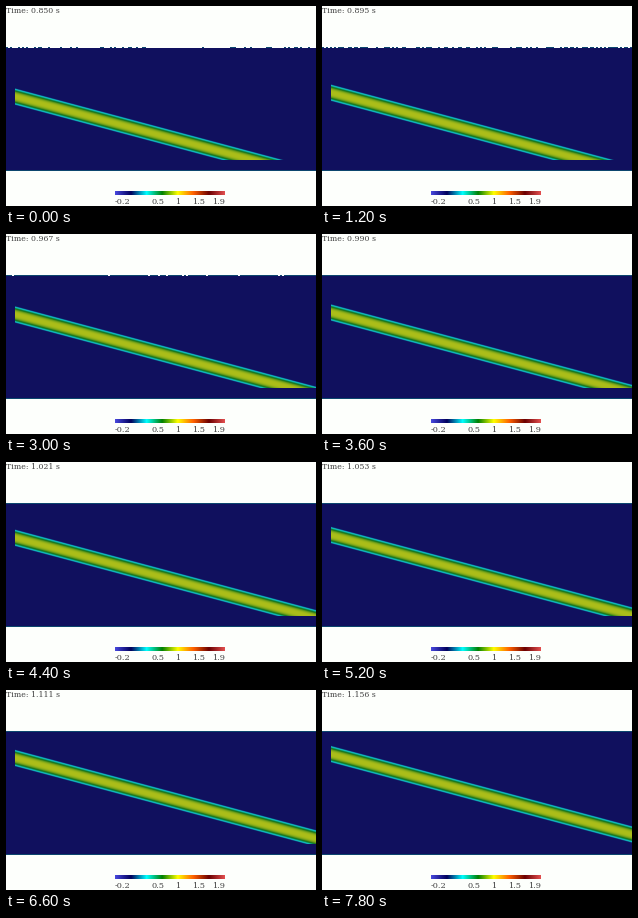
A matplotlib script that plays this animation: 310 by 200 pixels, repeating every 8 s.

```python
import numpy as np
import matplotlib.pyplot as plt
from matplotlib.animation import FuncAnimation

W, H, DPI = 310, 200, 100
FRAMES, INTERVAL = 40, 200
T0, DT, STEPS = 0.85, 0.0045, 68      # the clock advances in whole solver steps

PAPER = (253, 255, 252)
EDGE = (12, 70, 110)
TOP, BOTTOM = 41, 165                 # domain rows
LEFT, FLOOR = 9, 154                  # limits of the wave band
SLOPE, SPEED, START = 0.267, 86.7, 90.6
HALF = 8.5                            # half height of the band
REST, PEAK = 1 / 7, 0.545             # scale positions of still water and crest
SUB = 4                               # samples per pixel row

# evenly spaced keys of the colour scale
SCALE = ["#4747db", "#00005c", "#00ffff", "#008000",
         "#ffff00", "#ff6100", "#6b0000", "#e04d4d"]
KEYS = np.array([[int(c[k:k + 2], 16) for k in (1, 3, 5)] for c in SCALE])


def scale_colour(pos):
    knots = np.linspace(0, 1, len(KEYS))
    return np.stack([np.interp(pos, knots, ch) for ch in KEYS.T], axis=-1)


def lit(pos):
    """Scale colour as it looks under the scene's light."""
    return 0.75 * scale_colour(pos) + (16, 16, 25)


def make_backdrop():
    img = np.full((H, W, 3), PAPER, float)
    img[TOP:BOTTOM] = lit(REST)
    img[[TOP, BOTTOM - 1]] = EDGE
    img[185:189, 109:219] = scale_colour(np.linspace(0, 1, 110))
    return img


backdrop = make_backdrop()
dashes = np.repeat(np.random.default_rng(4).random(W // 2), 2)
xs = np.arange(LEFT, W) + 0.5
ys = TOP + 1 + (np.arange((FLOOR - TOP - 1) * SUB)[:, None] + 0.5) / SUB


def clock(i):
    return T0 + DT * round(STEPS * i / (FRAMES - 1))


def render(t):
    img = backdrop.copy()
    # broken light line on the upper rim that fades out
    img[TOP, dashes < 0.8 - 6 * (t - T0)] = PAPER

    centre = START - SPEED * (t - T0) + SLOPE * (xs - LEFT)
    dist = np.minimum(np.abs(ys - centre) / HALF, 1)
    band = lit(REST + (PEAK - REST) * (1 - dist ** 3))
    img[TOP + 1:FLOOR, LEFT:] = band.reshape(-1, SUB, len(xs), 3).mean(axis=1)
    return img.astype(np.uint8)


fig = plt.figure(figsize=(W / DPI, H / DPI), dpi=DPI, facecolor="white")
ax = fig.add_axes([0, 0, 1, 1])
ax.axis("off")
picture = ax.imshow(render(T0), extent=(0, W, H, 0), aspect="auto",
                    interpolation="nearest")


def label(x, y, text, px):
    return ax.text(x, y, text, family="DejaVu Serif", size=px * 72 / DPI,
                   color="#404040", ha="left", va="baseline")


time_text = label(0.5, 7, "", 7.8)
for x, text in [(108.5, "-0.2"), (145.5, "0.5"), (169.5, "1"),
                (186.5, "1.5"), (206.5, "1.9")]:
    label(x, 198, text, 8.2)


def update(i):
    t = clock(i)
    picture.set_data(render(t))
    time_text.set_text(f"Time: {t + 1e-9:.3f} s")
    return picture, time_text


anim = FuncAnimation(fig, update, frames=FRAMES, interval=INTERVAL,
                     init_func=lambda: update(0), repeat=True, repeat_delay=0)
plt.show()
```
